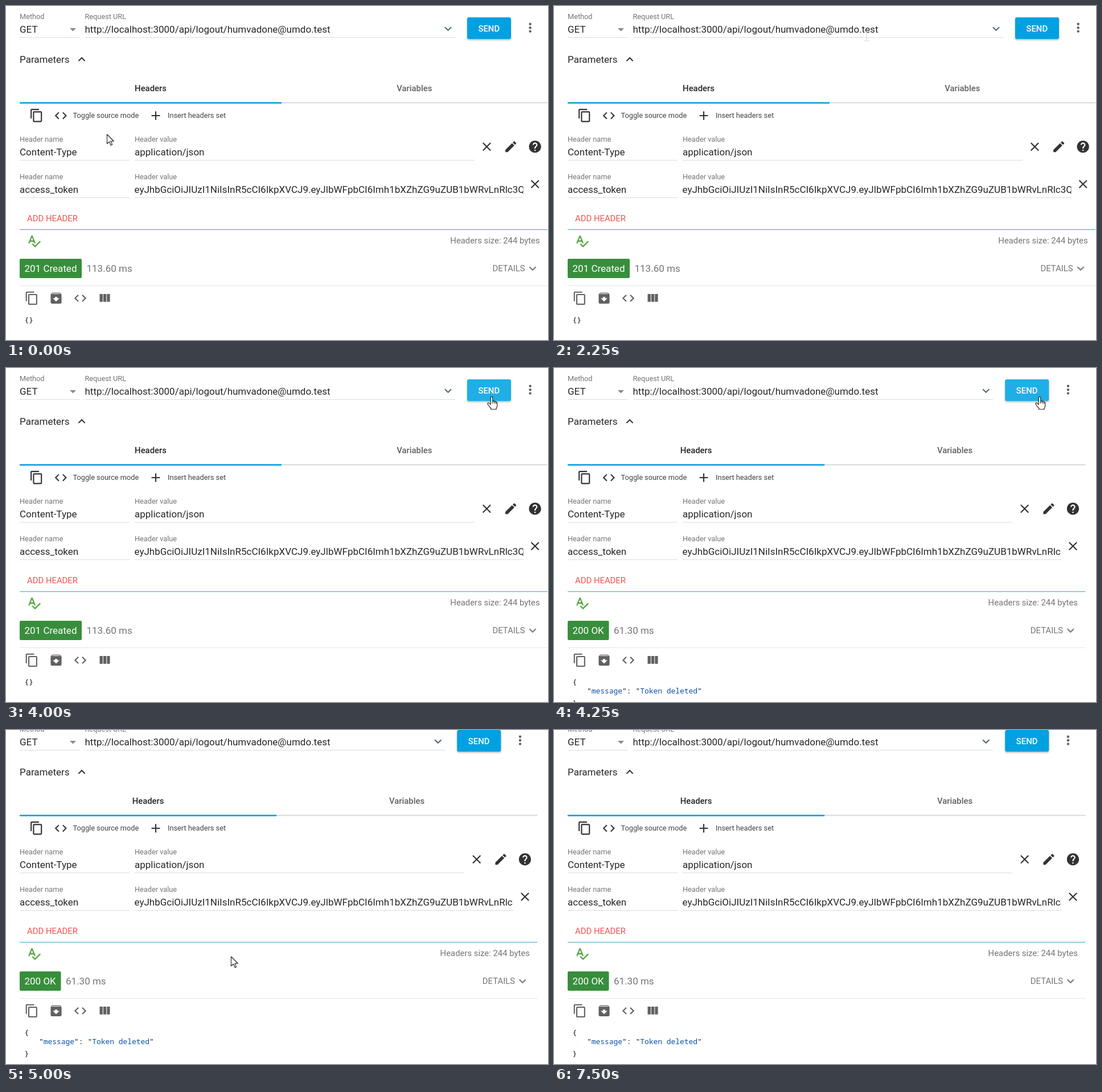
These frames come from a looping animation (952x588 px, 8500 ms). An HTML page:

```html
<!DOCTYPE html>
<html lang="en">
<head>
<meta charset="utf-8">
<title>Logout request</title>
<style>
@property --d { syntax: "<length>"; inherits: true; initial-value: 0px; }

html, body { margin: 0; width: 100%; height: 100%; overflow: hidden; background: #fff; }
svg { display: block; width: 952px; height: 588px; font: 17px Roboto, sans-serif; fill: #262626; }

/* --d is how far the right edge moves when the scrollbar gutter opens */
svg, .page, .before, .after, #send, .cursor, .cursor > g { animation: 8.5s step-end infinite; }
svg { animation-name: gutter; }
.page { animation-name: scroll; }
.before { animation-name: before; }
.after { animation-name: after; }
#send { animation-name: press; fill: #00a1e0; }

.r { transform: translateX(var(--d)); }
.q1 { transform: translateX(calc(var(--d) / 4)); }
.q3 { transform: translateX(calc(var(--d) * .75)); }
.w { width: calc(var(--w) + var(--d)); }
.half { width: calc(460px + var(--d) / 2); }

.lab { font-size: 12.75px; fill: #757575; }
.tool { font-size: 12.75px; fill: #424242; }
.btn { font-size: 14.875px; }
.tab { font-size: 14.875px; font-weight: 500; text-anchor: middle; }
.dim { fill: #757575; }
.line { fill: #dcdcdc; }
.icons { fill: #333; }
.grey { fill: #616161; }
.mono { font: 12.95px "Noto Sans Mono", monospace; fill: #111; white-space: pre; }
.key { fill: #0b4fa8; }

.cursor { animation-name: move; }
.cursor .arrow { animation-name: arrow; }
.cursor .beam { animation-name: beam; }
.cursor .hand { animation-name: hand; }
.arrow, .hand { fill: #fff; stroke: #111; stroke-width: 1.1; stroke-linejoin: round; }
.beam { fill: none; stroke: #d4d4d4; }

@keyframes gutter { 0% { --d: 0px; } 50%, 100% { --d: -17.7px; } }
@keyframes scroll { 0% { transform: none; } 58.82%, 100% { transform: translateY(-20px); } }
@keyframes before { 0% { opacity: 1; } 50%, 100% { opacity: 0; } }
@keyframes after { 0% { opacity: 0; } 50%, 100% { opacity: 1; } }
@keyframes press { 0%, 52.94%, 100% { fill: #00a1e0; } 47.05% { fill: #20aee6; } }

@keyframes move {
  0% { transform: translate(177.5px, 226px); }
  8.82% { transform: translate(140px, 178px); }
  11.76% { transform: translate(96px, 122px); }
  14.7% { transform: translate(72px, 78px); }
  17.64% { transform: translate(186px, 58px); }
  20.58% { transform: translate(301px, 53px); }
  23.52% { transform: translate(455px, 50px); }
  26.47% { transform: translate(549px, 53px); }
  32.35% { transform: translate(640px, 62px); }
  35.29% { transform: translate(735px, 65px); }
  38.23% { transform: translate(812px, 64px); }
  41.17% { transform: translate(853px, 50.5px); }
  52.94% { transform: translate(610px, 245px); }
  55.88% { transform: translate(395.5px, 399px); }
  64.7% { transform: translate(372px, 430px); }
  67.64% { transform: translate(320px, 475px); }
  70.58% { transform: translate(255px, 528px); }
  73.52% { transform: translate(198px, 552px); }
  76.47% { transform: translate(151px, 560px); }
  79.41% { transform: translate(330px, 400px); }
  82.35% { transform: translate(600px, 190px); }
  85.29% { transform: translate(800px, 20px); }
  88.23%, 100% { transform: translate(960px, -30px); }
}
@keyframes arrow {
  0%, 32.35%, 52.94%, 79.41% { opacity: 1; }
  17.64%, 41.17%, 70.58%, 88.23%, 100% { opacity: 0; }
}
@keyframes beam {
  0%, 32.35%, 79.41%, 100% { opacity: 0; }
  17.64%, 70.58% { opacity: 1; }
}
@keyframes hand {
  0%, 52.94%, 100% { opacity: 0; }
  41.17% { opacity: 1; }
}
</style>
</head>
<body>
<svg viewBox="0 0 952 588">
  <defs>
    <g id="copy"><path transform="scale(1.0625) translate(-12 -12)" d="M16 1H4c-1.1 0-2 .9-2 2v14h2V3h12V1zm3 4H8c-1.1 0-2 .9-2 2v14c0 1.1.9 2 2 2h11c1.1 0 2-.9 2-2V7c0-1.1-.9-2-2-2zm0 16H8V7h11v14z"/></g>
    <g id="code"><path transform="scale(1.0625) translate(-12 -12)" d="M9.4 16.6L4.8 12l4.6-4.6L8 6l-6 6 6 6 1.4-1.4zm5.2 0l4.6-4.6-4.6-4.6L16 6l6 6-6 6-1.4-1.4z"/></g>
    <g id="add"><path transform="scale(1.0625) translate(-12 -12)" d="M19 13h-6v6h-2v-6H5v-2h6V5h2v6h6v2z"/></g>
    <g id="close"><path transform="scale(1.0625) translate(-12 -12)" d="M19 6.41L17.59 5 12 10.59 6.41 5 5 6.41 10.59 12 5 17.59 6.41 19 12 13.41 17.59 19 19 17.59 13.41 12z"/></g>
    <g id="edit"><path transform="scale(1.0625) translate(-12 -12)" d="M3 17.25V21h3.75L17.81 9.94l-3.75-3.75L3 17.25zM20.71 7.04c.39-.39.39-1.02 0-1.41l-2.34-2.34c-.39-.39-1.02-.39-1.41 0l-1.83 1.83 3.75 3.75 1.83-1.83z"/></g>
    <g id="help"><path transform="scale(1.0625) translate(-12 -12)" d="M12 2C6.48 2 2 6.48 2 12s4.48 10 10 10 10-4.48 10-10S17.52 2 12 2zm1 17h-2v-2h2v2zm2.07-7.75l-.9.92C13.45 12.9 13 13.5 13 15h-2v-.5c0-1.1.45-2.1 1.17-2.83l1.24-1.26c.37-.36.59-.86.59-1.41 0-1.1-.9-2-2-2s-2 .9-2 2H8c0-2.21 1.79-4 4-4s4 1.79 4 4c0 .88-.36 1.68-.93 2.25z"/></g>
    <g id="down"><path transform="scale(1.0625) translate(-12 -12)" d="M16.59 8.59L12 13.17 7.41 8.59 6 10l6 6 6-6z"/></g>
    <g id="up"><path transform="scale(1.0625) translate(-12 -12)" d="M12 8l-6 6 1.41 1.41L12 10.83l4.59 4.58L18 14z"/></g>
    <g id="save"><path transform="scale(1.0625) translate(-12 -12)" d="M20.54 5.23l-1.39-1.68C18.88 3.21 18.47 3 18 3H6c-.47 0-.88.21-1.16.55L3.46 5.23C3.17 5.57 3 6.02 3 6.5V19c0 1.1.9 2 2 2h14c1.1 0 2-.9 2-2V6.5c0-.48-.17-.93-.46-1.27zM12 17.5L6.5 12H10v-2h4v2h3.5L12 17.5zM5.12 5l.81-1h12l.94 1H5.12z"/></g>
    <g id="cols"><path transform="scale(1.0625) translate(-12 -12)" d="M10 18h5V5h-5v13zm-6 0h5V5H4v13zM16 5v13h5V5h-5z"/></g>
    <g id="spell"><path transform="scale(1.0625) translate(-12 -12)" d="M12.45 16h2.09L9.43 3H7.57L2.46 16h2.09l1.12-3h5.64l1.14 3zm-6.02-5L8.5 5.48 10.57 11H6.43zm15.16.59l-8.09 8.09L9.83 16l-1.41 1.41 5.09 5.09L23 13l-1.41-1.41z"/></g>
  </defs>

  <g class="page">
    <!-- request line -->
    <text class="lab" x="24" y="23">Method</text>
    <text class="lab" x="138.5" y="23">Request URL</text>
    <text x="24" y="47">GET</text>
    <path fill="#8a8a8a" d="M112 39h11l-5.5 5.5z"/>
    <text x="138.5" y="46.8">http://localhost:3000/api/logout/humvadone@umdo.test</text>
    <rect class="line" x="24" y="55" width="106" height="1"/>
    <rect class="line w" style="--w:650px" x="139" y="55" height="1"/>
    <g class="r">
      <use href="#down" x="776.5" y="40" fill="#4d6f7d"/>
      <g style="filter: drop-shadow(0 2px 1.5px rgba(0,0,0,.28))">
        <rect id="send" x="810" y="20" width="77" height="38" rx="3"/>
      </g>
      <text class="tab" x="848.3" y="45" fill="#fff">SEND</text>
      <g class="grey">
        <circle cx="920.7" cy="31.8" r="2.2"/>
        <circle cx="920.7" cy="38.2" r="2.2"/>
        <circle cx="920.7" cy="44.6" r="2.2"/>
      </g>
    </g>

    <!-- tabs -->
    <text x="24" y="99.8">Parameters</text>
    <use class="icons" href="#up" x="133" y="94"/>
    <text class="tab q1" x="254" y="150">Headers</text>
    <text class="tab q3" x="717.3" y="150" fill="#616161">Variables</text>
    <rect class="w" style="--w:927px" x="24" y="169" height="2.5" fill="#e0e0e0"/>
    <rect class="half" x="24" y="169.3" height="2.5" fill="#00a1e0"/>

    <g class="icons">
      <use href="#copy" x="53.7" y="192.8"/>
      <use href="#code" x="96.3" y="193"/>
      <use href="#add" x="263" y="193"/>
    </g>
    <text class="tool" x="117.5" y="196.8">Toggle source mode</text>
    <text class="tool" x="284" y="196.8">Insert headers set</text>

    <!-- header rows -->
    <text class="lab" x="24" y="239">Header name</text>
    <text class="lab" x="226" y="239">Header value</text>
    <text x="24" y="262.7">Content-Type</text>
    <text x="226" y="262.7">application/json</text>
    <rect class="line" x="24" y="271" width="193" height="1"/>
    <rect class="line w" style="--w:597px" x="226" y="271" height="1"/>

    <text class="lab" x="24" y="305">Header name</text>
    <text class="lab" x="226" y="305">Header value</text>
    <text x="24" y="328.7">access_token</text>
    <text x="225.5" y="328.7">eyJhbGciOiJIUzI1NiIsInR5cCI6IkpXVCJ9.eyJlbWFpbCI6Imh1bXZhZG9uZUB1bWRvLnRlc3Q</text>
    <rect class="r" x="908.5" y="308" width="70" height="28" fill="#fff"/>
    <rect class="line" x="24" y="337" width="193" height="1"/>
    <rect class="line w" style="--w:683px" x="226" y="337" height="1"/>

    <g class="icons r">
      <use href="#close" x="844.4" y="247.7"/>
      <use href="#edit" x="886.7" y="247.7"/>
      <use href="#help" x="929.2" y="247.7"/>
      <use href="#close" x="929.2" y="313.6"/>
    </g>

    <text class="btn" x="37" y="379.2" fill="#ee5350">ADD HEADER</text>
    <rect class="w" style="--w:927px" x="24" y="393" height="1.2" fill="#4fb0cc"/>
    <use href="#spell" x="49.3" y="413.8" fill="#3f9a26"/>
    <text class="btn dim r" x="780.3" y="418.2">Headers size: 244 bytes</text>

    <!-- response -->
    <g class="before">
      <rect x="24" y="445" width="109" height="34" rx="2" fill="#388e3c"/>
      <text x="32.5" y="468" fill="#fff">201 Created</text>
      <text class="dim" x="141.5" y="468">113.60 ms</text>
      <text class="mono" x="32.5" y="557.3">{}</text>
    </g>
    <g class="after">
      <rect x="24" y="445" width="72.5" height="34" rx="2" fill="#388e3c"/>
      <text x="32.5" y="468" fill="#fff">200 OK</text>
      <text class="dim" x="105" y="468">61.30 ms</text>
      <text class="mono" x="32.5" y="557.3">{</text>
      <text class="mono" x="58" y="573">"<tspan class="key">message</tspan>": "<tspan class="key">Token deleted</tspan>"</text>
      <text class="mono" x="32.5" y="594">}</text>
    </g>
    <g class="dim r">
      <text class="btn" x="854.5" y="467.2">DETAILS</text>
      <use href="#down" x="925" y="462"/>
    </g>
    <rect class="w" style="--w:927px" x="24" y="492" height="1" fill="#e6e6e6"/>
    <g class="grey">
      <use href="#copy" x="45.3" y="514.4"/>
      <use href="#save" x="88" y="514.4"/>
      <use href="#code" x="130.5" y="514.4"/>
      <use href="#cols" x="173" y="514.4"/>
    </g>
  </g>

  <g class="cursor">
    <g class="arrow"><path d="M0 0V16.5L3.9 12.9L6.7 19.2L9.2 18.1L6.5 12H11.8Z"/></g>
    <g class="beam"><path d="M-4 -8.5H-1L0 -7.5L1 -8.5H4M0 -7.5V7.5M-4 8.5H-1L0 7.5L1 8.5H4"/></g>
    <g class="hand">
      <path d="M-1.8 14V1.8a1.8 1.8 0 0 1 3.6 0V8q2.4-1 3.1.6 2.2-.7 2.8.9 2.1-.3 2.1 2v4.5q0 2.2-1.7 4v2.3H-1.2v-1.8Q-4 17.8-6.8 13.2q-.9-2 .7-2.4 1.4-.3 4.3 3.2Z"/>
      <path fill="none" d="M1.8 8v4M4.9 8.9v3.4M7.7 9.8v2.8"/>
    </g>
  </g>
</svg>
</body>
</html>
```
